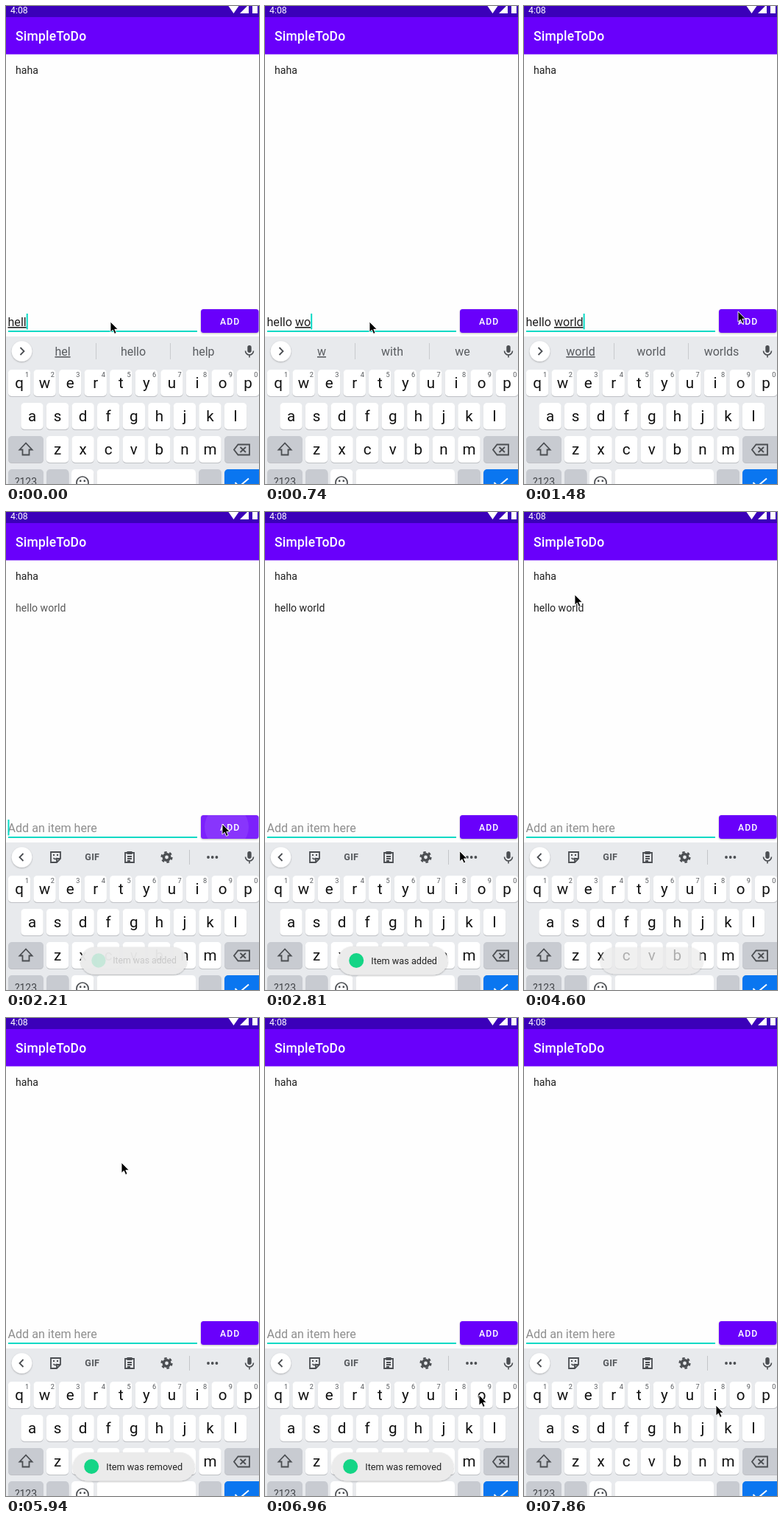
An HTML page that plays this animation: 344 by 648 pixels, repeating every 8 s.

```html
<!DOCTYPE html>
<html lang="en">
<head>
<meta charset="utf-8">
<title>To-do list</title>
<style>
html, body { margin: 0; width: 100%; height: 100%; overflow: hidden; background: #fefefe; }
svg { display: block; width: 344px; height: 648px; font-family: Roboto, sans-serif; }
text { white-space: pre; }
.mid { text-anchor: middle; }
.line { fill: none; stroke: #4b4e52; stroke-width: 1.8; }
</style>
</head>
<body>
<svg viewBox="0 0 344 648">
  <defs>
    <filter id="soft" x="-20%" y="-40%" width="140%" height="190%">
      <feDropShadow dx="0" dy="1" stdDeviation="1.2" flood-opacity=".28"/>
    </filter>
    <clipPath id="btn"><rect x="265" y="411" width="78.5" height="32" rx="3.5"/></clipPath>
  </defs>
  <rect width="344" height="648" fill="#fefefe"/>
  <rect width="344" height="65.5" fill="#6900fb"/>
  <rect width="344" height="15" fill="#3b00b9"/>
  <g fill="#fff">
    <text x="6" y="10" font-size="12.3">4:08</text>
    <path d="M302.5 0H316.5L309.5 10ZM318 10L330 -2V10ZM335 -2H342V10H335Z"/>
    <text x="13" y="47" font-size="17.5" font-weight="500" letter-spacing=".22">SimpleToDo</text>
  </g>
  <g font-size="14.1" fill="#212121">
    <text x="13" y="92">haha</text>
    <text id="item" x="13" y="135">hello world</text>
  </g>

  <g font-size="16.1">
    <text id="hint" x="2.5" y="434" fill="#8e8e8e">Add an item here</text>
    <text id="field" x="2.5" y="434" fill="#212121"><tspan id="done"></tspan><tspan id="word" text-decoration="underline"></tspan></text>
  </g>
  <rect x="3" y="440" width="257" height="2" fill="#08d9c5"/>
  <rect id="caret" y="417" width="2" height="21.5" fill="#08d9c5"/>

  <rect x="265" y="411" width="78.5" height="32" rx="3.5" fill="#6900fb" filter="url(#soft)"/>
  <g id="ripple" clip-path="url(#btn)" fill="#fff">
    <rect x="265" y="411" width="79" height="32" opacity=".13"/>
    <circle id="wave" cx="300" cy="427" opacity=".09"/>
  </g>
  <text x="291" y="431.6" font-size="12.25" font-weight="500" letter-spacing="1.09" fill="#fff">ADD</text>

  <rect y="448" width="344" height="200" fill="#e8eaed"/>
  <circle cx="21.5" cy="468" r="13.7" fill="#fff" filter="url(#soft)"/>
  <path id="chevron" class="line"/>
  <g id="words" font-size="16" fill="#5a5d61" class="mid">
    <text x="77" y="474" text-decoration="underline"></text>
    <text x="173" y="474"></text>
    <text x="268.5" y="474"></text>
    <path d="M122.5 457V479M223.5 457V479" stroke="#c9cbce"/>
  </g>
  <g id="tools">
    <path class="line" d="M61 461H74V470L69 475H61ZM69 475V470H74M64.5 469Q67 472 69.5 469"/>
    <path d="M64 464h2v2h-2zM69 464h2v2h-2z" fill="#4b4e52"/>
    <text x="117.3" y="472.3" class="mid" font-size="12.6" font-weight="700" fill="#55585c" letter-spacing=".3">GIF</text>
    <path class="line" d="M162 462H174V475H162ZM165 467H171M165 470H171M165 473H169"/>
    <path d="M164.5 460H171.500V464H164.500Z" fill="#4b4e52"/>
    <circle class="line" cx="218.500" cy="468" r="4.200" style="stroke-width:3.600"/>
    <circle class="line" cx="218.500" cy="468" r="6.900" style="stroke-width:2.400" stroke-dasharray="3.610 3.610"/>
    <path d="M249.500 458V478" stroke="#c4c6c9"/>
    <g fill="#4b4e52"><circle cx="275" cy="468" r="1.900"/><circle cx="280.700" cy="468" r="1.900"/><circle cx="286.400" cy="468" r="1.900"/></g>
  </g>
  <rect x="328.300" y="460" width="5.400" height="10" rx="2.700" fill="#4b4e52"/>
  <path class="line" d="M325.500 467.500a5.500 5.500 0 0 0 11 0M331 473V476.500" style="stroke-width:1.600"/>

  <g id="keys"></g>
  <path class="line" d="M27 592.500L18.500 601.500H22.500V608.500H31.500V601.500H35.500Z"/>
  <path class="line" d="M315.500 594.500H331V608.500H315.500L310 601.500ZM318.500 598L326 605M326 598L318.500 605"/>
  <text x="27" y="650" class="mid" font-size="14" fill="#44474b">?123</text>
  <circle class="line" cx="104" cy="646" r="8" style="stroke-width:1.700"/>
  <path d="M100 642.500h2.400v2.400h-2.400zM105.600 642.500h2.400v2.400h-2.400z" fill="#4b4e52"/>
  <path d="M311.500 646L317 651.500L330 640.500" fill="none" stroke="#fff" stroke-width="2"/>

  <g id="toast">
    <rect id="pill" y="589" height="38.500" rx="19.250" fill="#ebebeb" filter="url(#soft)"/>
    <g id="note">
      <circle id="dot" cy="608" r="10" fill="#14d586"/>
      <text id="msg" y="612.500" font-size="12.700" fill="#232323"></text>
    </g>
  </g>
  <path id="mouse" d="M0 0V14.200L3.300 11.200L5.600 16.400L8.100 15.300L5.800 10.300H10.200Z" fill="#000" stroke="#fff" stroke-width=".9"/>
</svg>
<script>
const $ = id => document.getElementById(id);
const LOOP = 8000;

// [step, ms]: the picture advances in steps of about 148 ms
const CLOCK = [[0, 0], [2, 300], [9, 1330], [10, 1480], [12, 1770], [14, 2060], [20, 2960], [21, 3110],
  [23, 3410], [30, 4450], [31, 4600], [33, 4900], [35, 5200], [42, 6230], [43, 6380], [45, 6670],
  [47, 6960], [53, 7860], [54, 8000]];

// [step, x, y] of the pointer tip
const PATH = [[0, 142, 428], [7, 142, 428], [9, 289, 407], [10, 291, 414], [12, 294, 423], [17, 294, 423],
  [20, 250, 478], [21, 246, 484], [22, 246, 484], [23, 239, 490], [25, 239, 490], [26, 262, 452],
  [27, 267, 400], [30, 75, 125], [31, 69, 112], [33, 62, 125], [38, 62, 125], [39, 103, 152],
  [40, 157, 196], [42, 267, 307], [44, 312, 440], [45, 298, 508], [46, 298, 508], [50, 270, 520],
  [52, 261, 525], [54, 261, 525]];

// [step, finished text, word in progress, suggestions]
const TYPING = [
  [0, "", "hell", "hel hello help"],
  [2, "", "hello", "hell hello help"],
  [3, "hello ", "", "hello hello hellos"],
  [4, "hello ", "wo", "w with we"],
  [5, "hello ", "wor", "wo would so"],
  [6, "hello ", "worl", "wor work world"],
  [7, "hello ", "world", "worl world work"],
  [8, "hello ", "world", "world world worlds"]];

const ADD = 14, REMOVE = 35;

function lerp(points, col, at, out) {
  let i = 1;
  while (i < points.length - 1 && points[i][col] <= at) i++;
  const a = points[i - 1], b = points[i];
  return a[out] + (b[out] - a[out]) * (at - a[col]) / (b[col] - a[col]);
}

const show = (id, alpha) => $(id).setAttribute("opacity", Number(alpha));

function set(id, attrs) {
  for (const name in attrs) $(id).setAttribute(name, attrs[name]);
}

function buildKeys() {
  let out = "";
  const key = (x, y, w, fill) => {
    out += `<rect x="${x}" y="${y + 1.1}" width="${w}" height="36" rx="5" fill="#bfc1c5"/>` +
      `<rect x="${x}" y="${y}" width="${w}" height="36" rx="5" fill="${fill}"/>`;
  };
  const label = (x, y, size, fill, s) => {
    out += `<text class="mid" x="${x}" y="${y}" font-size="${size}" fill="${fill}">${s}</text>`;
  };
  [["qwertyuiop", 18, 493], ["asdfghjkl", 35.5, 538], ["zxcvbnm", 70, 583]].forEach(([row, left, y], r) => {
    [...row].forEach((c, i) => {
      const x = left + i * 34.57;
      key(x - 15.2, y, 30.4, "#fff");
      label(x, y + 24.5, 20.6, "#111", c);
      if (!r) label(x + 10.7, y + 10, 9.2, "#55585c", (i + 1) % 10);
    });
  });
  const gray = "#c8cbd1";
  key(3, 583, 48, gray);
  key(297, 583, 52, gray);
  key(3, 628, 48, gray);
  key(55, 628, 30.4, gray);
  key(89, 628, 30.4, "#fff");
  key(123.5, 628, 134.5, "#fff");
  key(262, 628, 31, gray);
  key(297, 628, 52, "#0a76f0");
  $("keys").innerHTML = out;
}

function drawToast(step) {
  const added = step < REMOVE;
  const age = step - (added ? ADD : REMOVE) - 1;
  let look = [1, 1, 1]; // scale, pill alpha, note alpha
  if (age < 0 || age > 16) look = [1, 0, 0];
  else if (age === 0) look = [.966, .96, .17];
  else if (age === 15) look = [.975, .97, .35];
  else if (age === 16) look = [.933, .72, 0];
  const [scale, pill, note] = look;
  const half = added ? 74.5 : 82.5;
  $("msg").textContent = added ? "Item was added" : "Item was removed";
  set("pill", { x: 173.7 - half, width: half * 2 });
  set("dot", { cx: 198.7 - half });
  set("msg", { x: 218.7 - half });
  show("pill", pill);
  show("note", note);
  set("toast", { transform: `translate(173.7 608) scale(${scale}) translate(-173.7 -608)` });
}

function draw(ms) {
  const step = Math.floor(lerp(CLOCK, 1, ms, 0) + 1e-6);
  const now = lerp(CLOCK, 0, step, 1);
  const typing = step < ADD;

  const [, done, word, tips] = TYPING.filter(t => t[0] <= step).pop();
  $("done").textContent = typing ? done : "";
  $("word").textContent = typing ? word : "";
  const width = typing ? $("field").getComputedTextLength() : 0;
  set("caret", { x: 2.5 + width });
  const since = typing ? Math.max(0, now - 1036) : now - 2060;
  show("caret", since % 1000 < 500);
  show("hint", !typing);

  show("words", typing);
  show("tools", !typing);
  tips.split(" ").forEach((s, i) => { $("words").children[i].textContent = s; });
  set("chevron", { d: typing ? "M19.5 463L24.500 468L19.500 473" : "M23.500 463L18.500 468L23.500 473" });

  let item = 0;
  if (step === ADD) item = .1;
  else if (step === ADD + 1) item = .75;
  else if (step > ADD && step < REMOVE) item = 1;
  else if (step === REMOVE) item = .4;
  show("item", item);

  const press = step - ADD;
  show("ripple", press < 0 ? 0 : Math.max(0, Math.min(1, (4 - press) / 3)));
  set("wave", { r: 16 + 14 * Math.max(0, press) });

  drawToast(step);
  set("mouse", { transform: `translate(${lerp(PATH, 0, step, 1)} ${lerp(PATH, 0, step, 2)})` });
}

function tick() {
  draw(performance.now() % LOOP);
  requestAnimationFrame(tick);
}

buildKeys();
tick();
</script>
</body>
</html>
```
